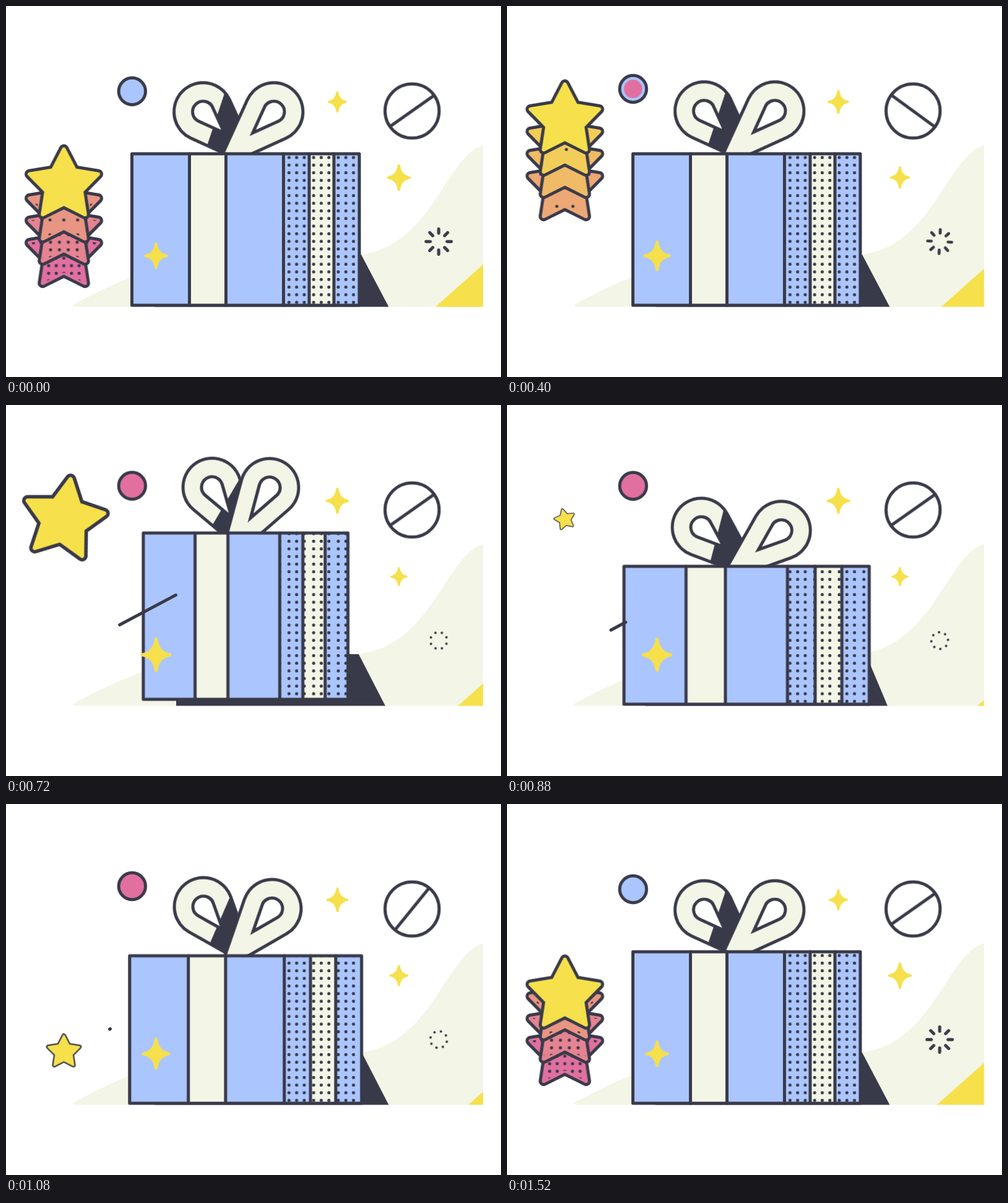
Animation of 800 by 600 pixels, one loop 1.56 s. Source, as an HTML page without scripts:

```html
<!DOCTYPE html>
<html lang="en">
<head>
<meta charset="utf-8">
<title>Gift box</title>
<style>
  :root {
    --ink: #393a49; --blue: #abc5fe; --cream: #f3f5e6; --yellow: #f6e04b; --pink: #e1709f;
    --loop: 1560ms;
  }
  html, body { margin: 0; width: 100%; height: 100%; overflow: hidden; background: #fff; }
  svg { display: block; width: 800px; height: 600px; }
  .ink { fill: none; stroke: var(--ink); stroke-width: 5; stroke-linecap: round; stroke-linejoin: round; }
  .blue { fill: var(--blue); }
  .cream { fill: var(--cream); }
  .pink { fill: var(--pink); }
  .yellow { fill: var(--yellow); }
  .dark { fill: var(--ink); }

  /* Every part shares the loop length; only the keyframes differ. */
  .box, .shadow, .bow, .corner, .star, .rise, .stamp, .spin, .rays, .streak, .to-pink, .to-blue {
    animation: var(--loop) linear infinite;
  }

  /* Box: stretch, slam, settle */
  .box { transform-origin: 387.5px 484px; animation-name: box; }
  .box * { vector-effect: non-scaling-stroke; }
  @keyframes box {
    0%, 28.2% { transform: none; animation-timing-function: ease-out; }
    46.15% { transform: translateY(-8px) scale(.9, 1.098); animation-timing-function: ease-in; }
    56.41% { transform: translateY(0) scale(1.079, .91); animation-timing-function: ease-out; }
    69.23% { transform: translateY(0) scale(1.02, .974); animation-timing-function: ease-in-out; }
    79.49%, 100% { transform: none; }
  }
  .shadow { animation-name: shadow; }
  @keyframes shadow {
    0%, 28.2% { d: path("M240 402H574L618.5 486.5H240Z"); animation-timing-function: ease-out; }
    46.15% { d: path("M275 403H570L613 486.5H275Z"); animation-timing-function: ease-in; }
    56.41% { d: path("M223 403H580L615 486.5H223Z"); animation-timing-function: ease-out; }
    69.23% { d: path("M240 402H575L618.5 486.5H240Z"); }
    79.49%, 100% { d: path("M240 402H574L618.5 486.5H240Z"); }
  }

  /* Bow: each loop is a ribbon round a ring, aimed along its own axis */
  .bow path { fill: none; stroke-linejoin: round; animation: ribbon var(--loop) infinite; }
  .bow .edge { stroke: var(--ink); stroke-width: 35; }
  .bow .face { stroke: var(--cream); stroke-width: 25; }
  .bow .shaded { stroke: url(#fold); }
  .right { animation-name: bow-right; }
  .left { animation-name: bow-left; }
  @keyframes ribbon {
    0%, 28.2%, 56.41%, 100% { d: path("M-151.7 22.5L-11.2 -30A32 32 0 1 1 -11.2 30L-91.4 0"); }
    46.15% { d: path("M-152.8 13.3L-9.4 -30.6A32 32 0 1 1 -9.4 30.6L-109.4 0"); }
  }
  @keyframes bow-right {
    0%, 100% { transform: translate(433px, 171px) rotate(-45deg); }
    28.2% { transform: translate(433px, 169.5px) rotate(-45deg); animation-timing-function: ease-out; }
    46.15% { transform: translate(426px, 133.5px) rotate(-58deg); animation-timing-function: ease-in; }
    56.41% { transform: translate(443.5px, 203px) rotate(-40deg); animation-timing-function: ease-out; }
    69.23% { transform: translate(430px, 169px) rotate(-50.5deg); animation-timing-function: ease-in-out; }
    79.49% { transform: translate(435px, 173px) rotate(-44deg); animation-timing-function: ease-in-out; }
    92% { transform: translate(433px, 171px) rotate(-45deg); }
  }
  @keyframes bow-left {
    0%, 100% { transform: translate(318.5px, 171px) scaleX(-1) rotate(-45deg); }
    28.2% { transform: translate(318.5px, 169.5px) scaleX(-1) rotate(-45deg); animation-timing-function: ease-out; }
    46.15% { transform: translate(333px, 133px) scaleX(-1) rotate(-57deg); animation-timing-function: ease-in; }
    56.41% { transform: translate(314px, 198px) scaleX(-1) rotate(-41deg); animation-timing-function: ease-out; }
    69.23% { transform: translate(319px, 166px) scaleX(-1) rotate(-50deg); animation-timing-function: ease-in-out; }
    79.49% { transform: translate(317px, 173px) scaleX(-1) rotate(-44deg); animation-timing-function: ease-in-out; }
    92% { transform: translate(318.5px, 171px) scaleX(-1) rotate(-45deg); }
  }

  .corner { transform-origin: 771px 486.5px; animation-name: corner; }
  @keyframes corner {
    0%, 100% { transform: none; }
    12.8% { transform: scale(.97); }
    25.64% { transform: scale(.9); }
    35.9% { transform: scale(.75); }
    46.15% { transform: scale(.53); }
    56.41% { transform: scale(.14); }
    59.6% { transform: scale(.06); }
    69.23% { transform: scale(.31); }
    79.49% { transform: scale(.52); }
    97.4% { transform: scale(.99); }
  }

  /* Star rises from its foot point, leaving stamps that expire behind it */
  .outer { stroke: var(--ink); stroke-width: 16; stroke-linejoin: round; }
  .inner { fill: var(--tint); stroke: var(--tint); stroke-width: 6; stroke-linejoin: round; }
  .rise { animation-name: rise; animation-delay: -350ms; }
  @keyframes rise {
    0% { transform: translateY(0); animation-timing-function: cubic-bezier(.37, 0, .63, 1); }
    44.2%, 84% { transform: translateY(-216px); }
    84.01%, 100% { transform: translateY(0); }
  }
  .star { --tint: var(--yellow); animation-name: star; }
  @keyframes star {
    0%, 33.3% { transform: rotate(0deg) scale(1); animation-timing-function: ease-in-out; }
    46.15% { transform: rotate(9.5deg) scale(1.13); animation-timing-function: ease-in; }
    56.41% { transform: rotate(-14deg) scale(.285); }
    59% { transform: rotate(-18deg) scale(0); }
    59.01%, 64.1% { transform: rotate(0deg) scale(0); }
    69.23% { transform: rotate(0deg) scale(.445); animation-timing-function: ease-out; }
    79.49% { transform: rotate(0deg) scale(1.14); animation-timing-function: ease-in-out; }
    87.2%, 100% { transform: rotate(0deg) scale(1); }
  }
  .stamp {
    --tint: color-mix(in srgb, var(--yellow) calc(var(--k) * 100% / 6), var(--pink));
    transform: translateY(calc(var(--k) * -36px));
    animation-name: stamp;
    animation-delay: calc(var(--k) * 85ms - 1805ms);
  }
  @keyframes stamp {
    0%, 27.6% { visibility: visible; }
    27.61%, 100% { visibility: hidden; }
  }

  /* Slow back-and-forth parts */
  .bob, .pulse { animation: 780ms cubic-bezier(.37, 0, .63, 1) infinite alternate; }
  .bob { animation-name: bob; }
  @keyframes bob { from { transform: translateY(3.7px); } to { transform: translateY(-3.7px); } }
  .pulse { stroke: var(--yellow); stroke-width: 5.5; stroke-linejoin: round; animation-name: pulse; }
  @keyframes pulse { from { transform: scale(var(--from)); } to { transform: scale(var(--to)); } }

  .to-pink { animation-name: to-pink; }
  .to-blue { animation-name: to-blue; }
  @keyframes to-pink {
    0%, 11.54% { transform: scale(0); animation-timing-function: ease-in-out; }
    34.6%, 100% { transform: none; }
  }
  @keyframes to-blue {
    0%, 71.8% { transform: scale(0); animation-timing-function: ease-in-out; }
    94.87%, 100% { transform: none; }
  }

  .bar { animation: bar 780ms infinite; }
  @keyframes bar {
    0%, 26.67% { transform: rotate(-35.2deg); animation-timing-function: cubic-bezier(.65, 0, .35, 1); }
    85%, 100% { transform: rotate(-395.2deg); }
  }

  .spin { animation-name: spin; }
  @keyframes spin {
    0% { transform: rotate(0deg); }
    25.64% { transform: rotate(3deg); }
    46.15% { transform: rotate(22deg); }
    56.41% { transform: rotate(40deg); }
    69.23% { transform: rotate(60deg); }
    79.49% { transform: rotate(80deg); }
    97.4%, 100% { transform: rotate(90deg); }
  }
  .rays { animation-name: rays; }
  @keyframes rays {
    0%, 96%, 100% { stroke-dasharray: 7px 30px; stroke-width: 5px; }
    25.64% { stroke-dasharray: 6px 30px; stroke-width: 4.7px; }
    46.15%, 69.23% { stroke-dasharray: 0px 30px; stroke-width: 4px; }
    79.49% { stroke-dasharray: .4px 30px; stroke-width: 4.4px; }
  }

  .streak { animation-name: streak; }
  @keyframes streak {
    0%, 33.3% { stroke-dasharray: 0px 400px; stroke-dashoffset: 0px; visibility: hidden; }
    33.31% { stroke-dasharray: 0px 400px; stroke-dashoffset: 0px; visibility: visible; }
    46.15% { stroke-dasharray: 91px 400px; stroke-dashoffset: -15px; }
    51.3% { stroke-dasharray: 58px 400px; stroke-dashoffset: -65px; }
    56.41% { stroke-dasharray: 24px 400px; stroke-dashoffset: -98px; animation-timing-function: ease-out; }
    69.23% { stroke-dasharray: 1px 400px; stroke-dashoffset: -121.5px; visibility: visible; }
    71.8%, 100% { stroke-dasharray: 0px 400px; stroke-dashoffset: -123px; visibility: hidden; }
  }
</style>
</head>
<body>
<svg viewBox="0 0 800 600" xmlns="http://www.w3.org/2000/svg">
  <defs>
    <path id="star" d="M0-58.4L17.6-24.3L55.5-18L28.5 9.3L34.3 47.2L0 30L-34.3 47.2L-28.5 9.3L-55.5-18L-17.6-24.3Z"/>
    <g id="badge"><use href="#star" class="outer"/><use href="#star" class="inner"/></g>
    <path id="spark" d="M0-25.2Q3-3 22.2 0Q3 3 0 25.2Q-3 3-22.2 0Q-3-3 0-25.2Z"/>
    <path id="ray" d="M0-13.5V-21"/>
    <g id="rays4">
      <use href="#ray"/><use href="#ray" transform="rotate(45)"/>
      <use href="#ray" transform="rotate(90)"/><use href="#ray" transform="rotate(135)"/>
    </g>
    <circle id="dot" r="2.5" class="dark"/>

    <pattern id="boxDots" patternUnits="userSpaceOnUse" x="454.4" y="238.9" width="39.8" height="12.33">
      <use href="#dot" x="3" y="6.1"/><use href="#dot" x="15.3" y="6.1"/><use href="#dot" x="27.6" y="6.1"/>
    </pattern>
    <pattern id="dots0" patternUnits="userSpaceOnUse" x="-6.15" y="12.85" width="12.3" height="12.3"><use href="#dot" x="6.15" y="6.15"/></pattern>
    <pattern id="dots1" patternUnits="userSpaceOnUse" x="0" y="10.85" width="14.3" height="12.3"><use href="#dot" x="7.15" y="6.15"/></pattern>
    <pattern id="dots2" patternUnits="userSpaceOnUse" x="-11.15" y="5" width="22.3" height="24"><use href="#dot" x="11.15" y="12"/></pattern>
    <pattern id="dots3" patternUnits="userSpaceOnUse" x="0" y="18" width="26" height="26"><use href="#dot" x="13" y="13"/></pattern>

    <!-- Hard edge where the front loop shades the back one -->
    <linearGradient id="fold" gradientUnits="userSpaceOnUse" x1="-22.6" y1="-7.7" x2="-22.2" y2="-7.5">
      <stop offset="0" stop-color="#393a49"/><stop offset="1" stop-color="#f3f5e6"/>
      <animateTransform attributeName="gradientTransform" type="translate" dur="1.56s" repeatCount="indefinite"
        keyTimes="0;.282;.4615;.5641;.6923;.7949;1" values="0 0;0 0;-9 0;-5 0;-11 0;0 0;0 0"/>
    </linearGradient>
    <clipPath id="side"><rect class="box" x="448.5" y="239" width="122.5" height="245"/></clipPath>
  </defs>

  <path class="cream" d="M111 486.5Q107 485 110 482.5C140 466 190 441 225 431L400 420L560 403C686 399 708 245 771 225V486.5Z"/>
  <path class="corner yellow" d="M694 486.5L771 418V486.5Z"/>
  <path class="shadow dark" d="M240 402H574L618.5 486.5H240Z"/>

  <g class="bow left"><path class="edge"/><path class="face shaded"/></g>
  <g class="bow right"><path class="edge"/><path class="face"/></g>

  <g class="box">
    <rect class="blue" x="203.5" y="239" width="367.5" height="245"/>
    <path class="cream" d="M296.5 239H355.5V484H296.5ZM490 239H530V484H490Z"/>
  </g>
  <g clip-path="url(#side)"><rect x="430" y="190" width="180" height="300" fill="url(#boxDots)"/></g>
  <g class="box ink">
    <rect x="203.5" y="239" width="367.5" height="245"/>
    <path d="M296.5 239V484M355.5 239V484M448.5 239V484M490 239V484M530 239V484"/>
  </g>

  <path class="streak ink" pathLength="123" d="M290 299L167 364.5"/>

  <g transform="translate(242.5 404)"><use href="#spark" class="pulse yellow" style="--from:.77;--to:1"/></g>
  <g transform="translate(535.5 155)"><use href="#spark" class="pulse yellow" style="--from:.62;--to:.76"/></g>
  <g transform="translate(635 277.5)"><use href="#spark" class="pulse yellow" style="--from:.77;--to:.55"/></g>

  <g transform="translate(203.8 134.2)">
    <g class="bob">
      <circle class="blue" r="21.5"/>
      <circle class="to-pink pink" r="21.5"/>
      <circle class="to-blue blue" r="21.5"/>
      <circle class="ink" r="21.7"/>
    </g>
  </g>

  <g class="ink" transform="translate(656.3 169.7)">
    <circle r="43.7"/>
    <path class="bar" d="M-43 0H43"/>
  </g>

  <g transform="translate(699.3 381)">
    <g class="spin">
      <g class="rays ink"><use href="#rays4"/><use href="#rays4" transform="rotate(180)"/></g>
    </g>
  </g>

  <g transform="translate(93.5 401)">
    <g class="stamp" style="--k:0"><use href="#badge"/><use href="#star" fill="url(#dots0)"/></g>
    <g class="stamp" style="--k:1"><use href="#badge"/><use href="#star" fill="url(#dots1)"/></g>
    <g class="stamp" style="--k:2"><use href="#badge"/><use href="#star" fill="url(#dots2)"/></g>
    <g class="stamp" style="--k:3"><use href="#badge"/><use href="#star" fill="url(#dots3)"/></g>
    <g class="stamp" style="--k:4"><use href="#badge"/></g>
    <g class="stamp" style="--k:5"><use href="#badge"/><use href="#dot" x="2.5" y="11"/></g>
    <g class="rise"><g class="star"><use href="#badge"/></g></g>
  </g>
</svg>
</body>
</html>
```
